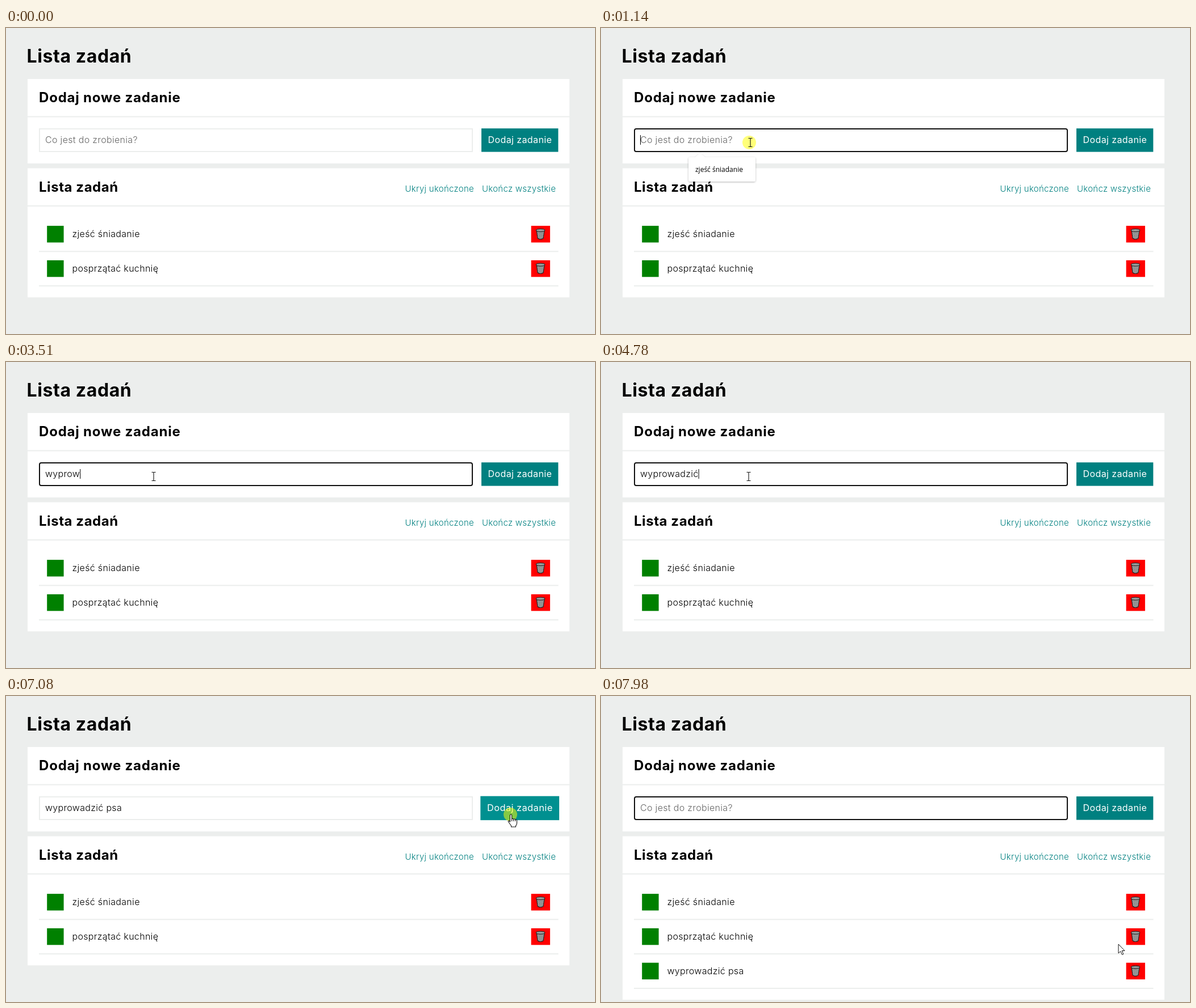
Animation, 1037 px wide and 540 px high, one loop 8 s. Source, as an HTML page:

```html
<!DOCTYPE html>
<html lang="pl">
<head>
<meta charset="utf-8">
<title>Lista zadań</title>
<style>
html, body { margin: 0; height: 100%; overflow: hidden; background: #eceeed; }
svg { display: block; }
text { font: 300 16px Montserrat, Inter, sans-serif; letter-spacing: .32px; white-space: pre; }
.h1 { font-size: 32px; font-weight: 700; letter-spacing: .6px; }
.h2 { font-size: 24px; font-weight: 700; letter-spacing: .55px; }
.wide { letter-spacing: .8px; }
.link { font-size: 15px; fill: #008080; letter-spacing: .28px; }
.label { font-weight: 400; letter-spacing: .4px; fill: #fff; }
.hint { font: 12px "Open Sans", "Noto Sans", sans-serif; letter-spacing: 0; }
.card { fill: #fff; }
.line { fill: #eceeed; }
</style>
</head>
<body>
<svg width="1037" height="540" viewBox="0 0 1037 540">
  <defs>
    <pattern id="mesh" width="3" height="3" patternUnits="userSpaceOnUse">
      <rect width="3" height="3" fill="#b4b4b4"/>
      <path d="M0 0L3 3M3 0L0 3" stroke="#555" stroke-width=".6"/>
    </pattern>
    <filter id="shadow" x="-10%" y="-20%" width="120%" height="150%">
      <feDropShadow dx="0" dy="1" stdDeviation="1.5" flood-opacity=".3"/>
    </filter>
    <g id="row">
      <rect x="72.2" y="349.1" width="29.4" height="29.4" fill="#008000"/>
      <rect x="924.6" y="349.1" width="33.3" height="29.4" fill="#f00"/>
      <g stroke="#222" stroke-width="1.1" stroke-linejoin="round">
        <path d="M934 357L936 371Q941 374.5 946 371L948 357Z" fill="url(#mesh)"/>
        <ellipse cx="941" cy="357" rx="7.7" ry="2.5" fill="#999"/>
      </g>
      <rect class="line" x="58" y="393.3" width="914.5" height="2"/>
    </g>
  </defs>

  <text class="h1" x="36.5" y="61">Lista zadań</text>
  <rect class="card" x="38" y="90" width="954" height="149"/>
  <rect class="line" x="38" y="155.5" width="954" height="2"/>
  <text class="h2 wide" x="58" y="131">Dodaj nowe zadanie</text>
  <rect id="box"/>
  <text id="field" x="69" y="203"></text>
  <rect id="caret" y="189" width="1" height="17"/>
  <g id="button">
    <rect x="837" y="177.2" width="135.3" height="41.4"/>
    <text class="label" x="848.5" y="203">Dodaj zadanie</text>
  </g>

  <rect class="card" id="list" x="38" y="247.5" width="954"/>
  <rect class="line" x="38" y="313" width="954" height="2"/>
  <text class="h2" x="58" y="289">Lista zadań</text>
  <text class="link" x="702.5" y="289">Ukryj ukończone</text>
  <text class="link" x="838" y="289">Ukończ wszystkie</text>
  <use href="#row"/>
  <text x="116.5" y="369">zjeść śniadanie</text>
  <use href="#row" y="60.8"/>
  <text x="116.5" y="430">posprzątać kuchnię</text>
  <g id="added">
    <use href="#row" y="121.6"/>
    <text x="116.5" y="490.5">wyprowadzić psa</text>
  </g>

  <g id="popup">
    <path filter="url(#shadow)" fill="#fff" d="M157 228H166L174.500 220.500L183 228H269Q272 228 272 231V268Q272 271 269 271H157Q154 271 154 268V231Q154 228 157 228Z"/>
    <text class="hint" x="166" y="254">zjeść śniadanie</text>
  </g>

  <circle id="glow" r="12" fill="#ff0" fill-opacity=".52"/>
  <g id="beam" fill="none" stroke="#111" stroke-width="1.1">
    <path d="M-3.500 -7.500H-1Q0 -7.500 0 -6.500Q0 -7.500 1 -7.500H3.500M0 -6.500V7M-3.500 7.500H-1Q0 7.500 0 6.500Q0 7.500 1 7.500H3.500"/>
  </g>
  <g id="hand" fill="#fff" stroke="#111" stroke-width="1.1" stroke-linejoin="round">
    <path d="M-1.500 13V1.500Q-1.500 0 0 0T1.500 1.500V8Q3 6.500 4.500 8.500Q6 7.300 7.500 9Q10.500 8.500 10.500 11.500V15Q10.500 18 8.500 20V22H.500V20L-4.500 13Q-5.500 11 -3.500 11Z"/>
    <path d="M1.500 8V12M4.500 8.500V12M7.500 9V12"/>
  </g>
  <g id="arrow">
    <path fill="#fff" stroke="#111" stroke-linejoin="round" d="M0 0V16L3.700 12.500L6.500 18.500L8.800 17.500L6.200 11.500H11Z"/>
  </g>
</svg>
<script>
const LOOP = 8000, TASK = "wyprowadzić psa";
const keyTimes = [1950, 2230, 2690, 3020, 3240, 3510, 3710, 3980,
                  4180, 4380, 4780, 4980, 5310, 5510, 5640];
// pointer stops: time, x, y
const path = [
  [470, 430, 514], [540, 395, 440], [610, 355, 360], [670, 318, 290],
  [740, 288, 238], [810, 270, 212], [870, 263, 202], [1270, 260, 202],
  [6330, 350, 201], [6400, 560, 197], [6460, 766, 193],
  [6530, 858, 199], [6600, 882, 206], [6670, 889, 209],
  [7640, 889, 214], [7710, 888, 232], [7770, 887, 275],
  [7840, 888, 340], [7910, 894, 399], [7980, 911, 438]
];

const $ = id => document.getElementById(id);
const within = (t, a, b) => t >= a && t < b;
const ramp = (t, a, b) => Math.min(1, Math.max(0, (t - a) / (b - a)));
const show = (id, on) => $(id).style.display = on ? "" : "none";
function set(id, attrs) {
  for (const name in attrs) $(id).setAttribute(name, attrs[name]);
}

function drawInput(t) {
  const focused = within(t, 1010, 7010) || t >= 7210;
  set("box", {
    x: 59, y: 178, width: 762, height: 40, fill: "#fff", "stroke-width": 2,
    rx: focused ? 3 : 0, stroke: focused ? "#101010" : "#eceeed"
  });
  const typed = t < 7210 ? TASK.slice(0, keyTimes.filter(k => k <= t).length) : "";
  $("field").textContent = typed || "Co jest do zrobienia?";
  set("field", { fill: typed ? "#000" : "#666" });
  set("caret", { x: 69 + (typed ? $("field").getComputedTextLength() : 0) });
  show("caret", within(t, 1070, 1620) || within(t, 1950, 6190) ||
                within(t, 6690, 7010) || within(t, 7210, 7710));
}

function drawButton(t) {
  const hover = ramp(t, 6530, 6740) - ramp(t, 7710, 7910);
  const tone = 128 + 16 * hover;
  set("button", {
    fill: `rgb(0,${tone},${tone})`,
    transform: `translate(904.65 197.8) scale(${1 + .025 * hover}) translate(-904.65 -197.8)`
  });
}

function drawPointer(t) {
  const stop = path.filter(p => p[0] <= t).pop();
  const [, x, y] = stop || [0, 0, 0];
  const inRow = within(y, 177, 220);
  const kind = !stop ? "" : inRow && within(x, 58, 822) ? "beam"
             : inRow && within(x, 836, 975) ? "hand" : "arrow";
  for (const id of ["beam", "hand", "arrow"]) {
    show(id, id === kind);
    set(id, { transform: `translate(${x} ${y})` });
  }
  show("glow", within(t, 1010, 1270) || within(t, 7010, 7210));
  set("glow", { cx: kind === "beam" ? x - 2 : x - 1, cy: y });
}

function draw(t) {
  const added = t >= 7210;
  drawInput(t);
  drawButton(t);
  set("list", { height: added ? 288.5 : 227.8 });
  show("added", added);
  show("popup", within(t, 1070, 2160));
  set("popup", { opacity: 1 - ramp(t, 1950, 2160) });
  drawPointer(t);
}

const start = performance.now();
function tick() {
  draw((performance.now() - start) % LOOP);
  requestAnimationFrame(tick);
}
tick();
</script>
</body>
</html>
```
